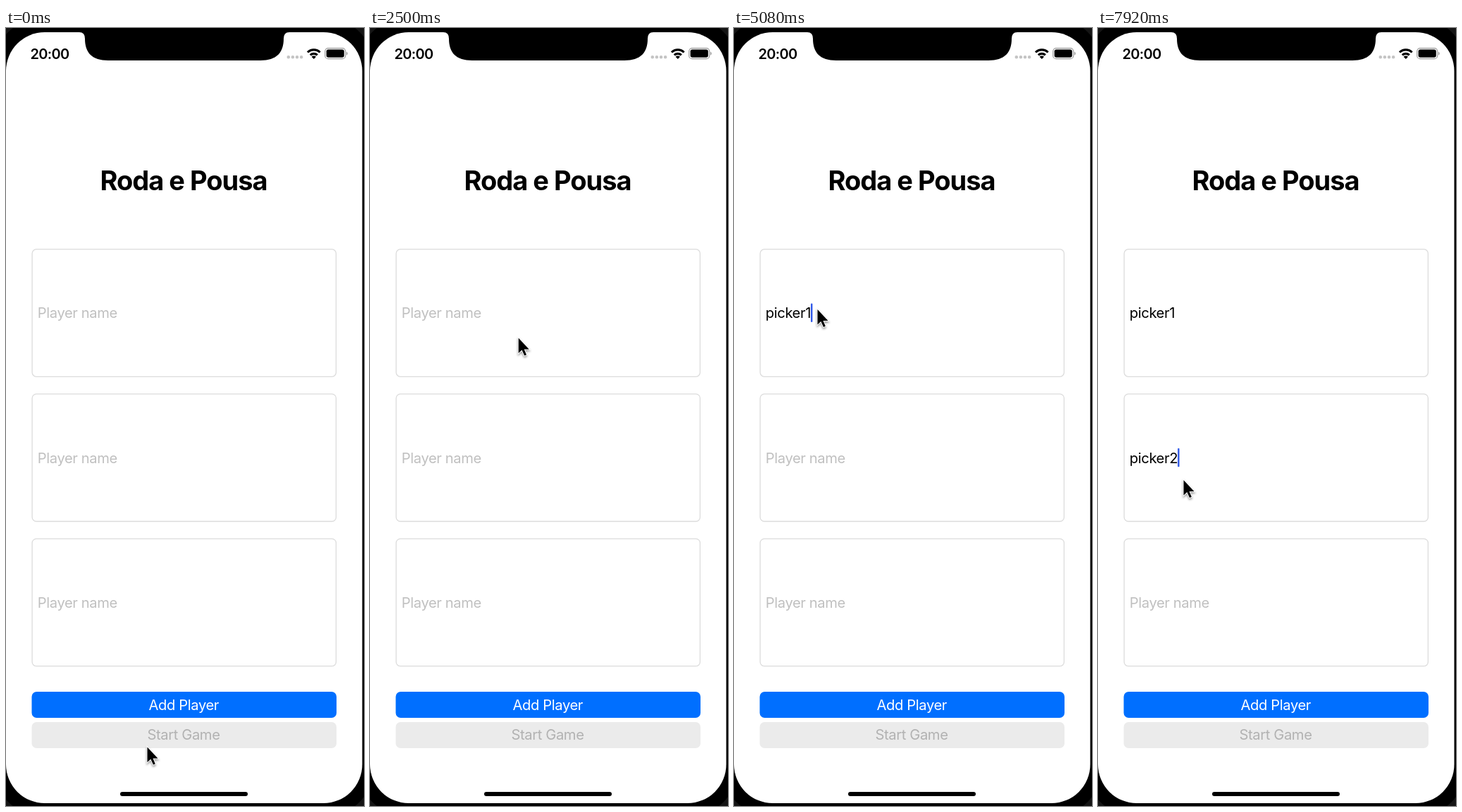
An HTML page that plays this animation: 508x1103 px, repeating every 8000 ms.

```html
<!DOCTYPE html>
<html lang="pt">
<head>
<meta charset="utf-8">
<title>Roda e Pousa</title>
<style>
  html, body { margin: 0; width: 100%; height: 100%; overflow: hidden; background: #000; }
  svg { display: block; width: 100%; height: 100%; }
  text { font: 20.2px Inter, "Open Sans", sans-serif; letter-spacing: -.4px; white-space: pre; }
  .mid { text-anchor: middle; }
  .title { font-size: 38px; font-weight: 700; letter-spacing: -1px; }
  .clock { font-size: 20px; font-weight: 600; letter-spacing: -.7px; }
  .box { fill: #fff; stroke: #dcdcdc; stroke-width: 1.3; }
  #pointer { filter: drop-shadow(0 2px 1.5px #0006); }
</style>
</head>
<body>
<svg viewBox="0 0 508 1103">
  <rect width="508" height="1103" fill="#151515"/>
  <rect x="-17" y="-15" width="539" height="1133" rx="70"/>
  <rect y="6" width="505.500" height="1093" rx="55" fill="#fff"/>
  <path d="M104 5V6Q112 6 112 15C112 35 122 46 145 46H361C384 46 394 35 394 15Q394 6 402 6V5Z"/>

  <text class="clock" x="34.500" y="43.500">20:00</text>
  <path d="M400.800 41.200H422" stroke="#c4c4c4" stroke-width="4.600" stroke-linecap="round" stroke-dasharray="0 6.100"/>
  <g fill="none" stroke="#000" stroke-width="3.100">
    <path d="M428 34.500A12.500 12.500 0 0 1 445.600 34.500"/>
    <path d="M431.800 38.400A7.200 7.200 0 0 1 441.800 38.400"/>
  </g>
  <path d="M436.800 44L433.600 40.700A4.600 4.600 0 0 1 440 40.700Z"/>
  <rect x="452.700" y="28.700" width="29" height="15" rx="4.500" fill="none" stroke="#999" stroke-width="1.200"/>
  <rect x="454.600" y="30.600" width="25.200" height="11.200" rx="2.800"/>
  <path d="M483.200 33.600Q486 36.200 483.200 38.800Z" fill="#888"/>

  <text class="title mid" x="252" y="230">Roda e Pousa</text>
  <g id="fields"></g>

  <rect x="36.500" y="941" width="432.500" height="37" rx="7" fill="#006fff"/>
  <text class="mid" x="252.300" y="966.500" fill="#fff">Add Player</text>
  <rect x="36.500" y="984" width="432.500" height="37" rx="7" fill="#ebebeb"/>
  <text class="mid" x="252" y="1009.300" fill="#b2b2b2">Start Game</text>
  <rect x="162" y="1083" width="181" height="6" rx="3"/>

  <rect id="caret" width="2.400" height="26.500" rx="1" fill="#3159e8"/>
  <path id="pointer" d="M0 0V21.500L4.800 17L8.500 25L11.300 23.800L8 16H15Z" stroke="#fff" stroke-width="2" paint-order="stroke"/>
</svg>
<script>
const LOOP = 8000, STEP = 1000 / 12, KEY_TIME = 163, LEFT = 44.8;
const $ = id => document.getElementById(id);
const clamp = v => Math.min(1, Math.max(0, v));
const ease = u => u * u * (3 - 2 * u);

const fields = [
  { focus: 2920, typeAt: 4005, word: 'picker1' },
  { focus: 5830, typeAt: 6590, word: 'picker2' },
  { focus: Infinity, typeAt: Infinity, word: '' }
];
fields.forEach((field, i) => field.top = 313.7 + 205.2 * i);
$('fields').innerHTML = fields.map(({ top }) =>
  `<rect class="box" x="37.100" y="${top}" width="431.300" height="180.600" rx="6"/>
   <text x="${LEFT}" y="${top + 97.6}"></text>`).join('');
const labels = [...$('fields').querySelectorAll('text')];

// The pointer glides to each stop, bowing sideways by bend
const home = { x: 200.5, y: 1019.5 };
const glides = [
  { start: 250, end: 830, x: 217.5, y: 442.5, bend: 62 },
  { start: 2420, end: 2920, x: 118.5, y: 399, bend: 0 },
  { start: 5080, end: 5600, x: 121.5, y: 605, bend: -10 },
  { start: 7580, end: 7920, x: 121.5, y: 641, bend: 0 }
];

function pointerAt(t) {
  let { x, y } = home;
  for (const g of glides) {
    const p = ease(clamp((t - g.start) / (g.end - g.start)));
    x += (g.x - x) * p + g.bend * Math.sin(Math.PI * p);
    y += (g.y - y) * p;
    if (p < 1) break;
  }
  return [x, y];
}

function draw(t) {
  const typed = fields.map(f => f.word.slice(0, Math.max(0, Math.ceil((t - f.typeAt) / KEY_TIME))));
  labels.forEach((label, i) => {
    label.textContent = typed[i] || 'Player name';
    label.setAttribute('fill', typed[i] ? '#000' : '#c0c0c0');
  });

  const active = t < fields[1].focus ? 0 : 1;
  const { focus, top } = fields[active];
  const width = typed[active] ? labels[active].getComputedTextLength() : 0;
  // An idle caret stays for half a second, then fades
  const idle = clamp(1 - (t - focus - 500) / 220);
  $('caret').setAttribute('x', LEFT + width);
  $('caret').setAttribute('y', top + 76.8);
  $('caret').setAttribute('opacity', t < focus ? 0 : typed[active] ? 1 : idle);
  $('pointer').setAttribute('transform', `translate(${pointerAt(t)})`);
}

function tick() {
  const t = performance.now() % LOOP;
  draw(Math.floor(t / STEP + .05) * STEP);
  requestAnimationFrame(tick);
}
tick();
</script>
</body>
</html>
```
